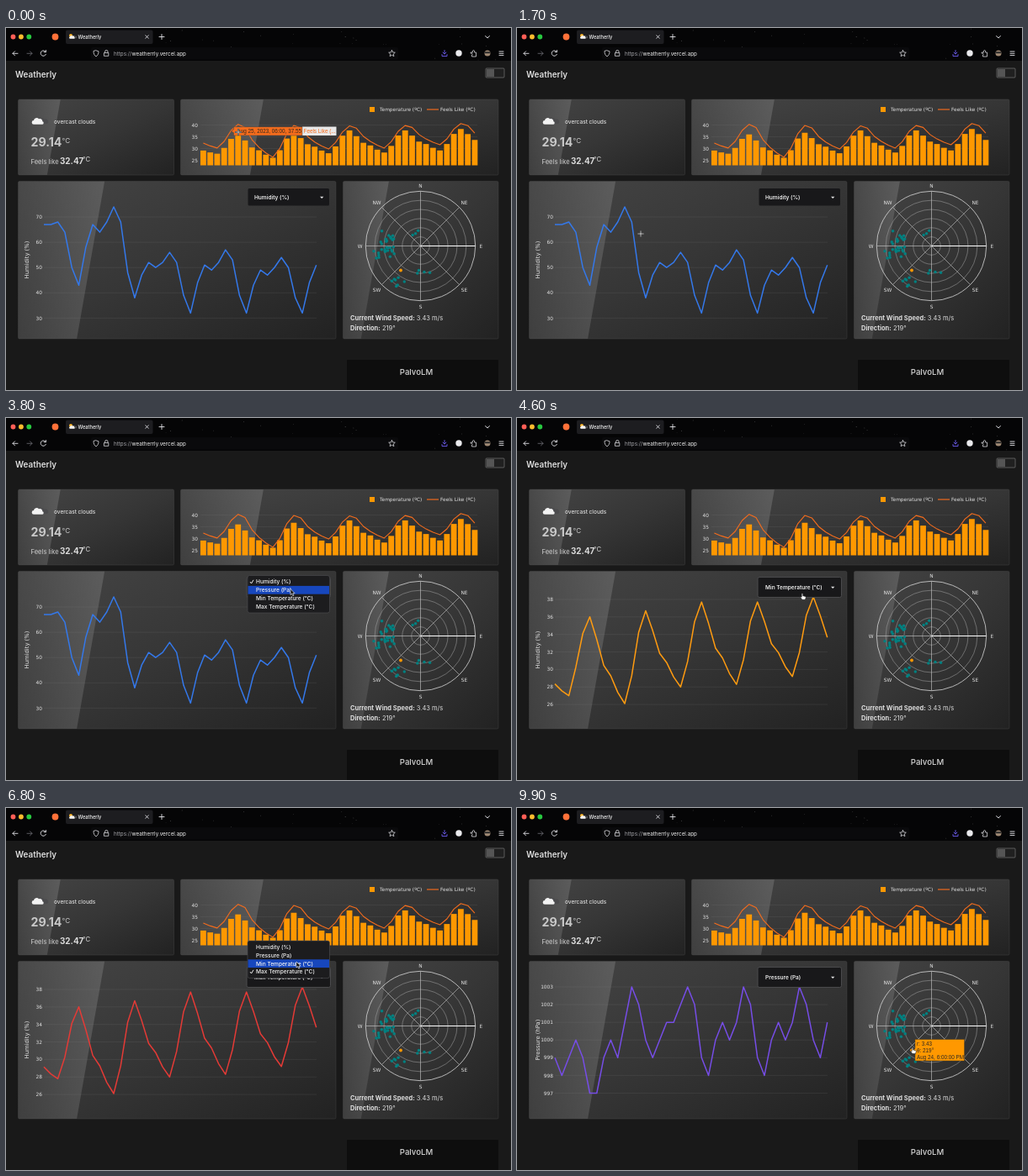
Animation, 600 px wide and 431 px high, one loop 10000 ms. Source, as an HTML page:

```html
<!DOCTYPE html>
<html lang="en">
<head>
<meta charset="utf-8">
<title>Weatherly</title>
<style>
html, body { margin: 0; width: 100%; height: 100%; overflow: hidden; background: #191919; }
svg { display: block; width: 600px; height: 431px; font-family: Inter, sans-serif; }
.plot { font-family: "DejaVu Sans", Verdana, sans-serif; font-size: 5.85px; fill: #e2e2e2; }
.tip { font-family: "Liberation Sans", Arial, sans-serif; font-size: 6.35px; }
</style>
</head>
<body>
<svg id="stage" viewBox="0 0 600 431" xmlns="http://www.w3.org/2000/svg"></svg>
<script>
const LOOP = 10000, STEP = 100;
const svg = document.getElementById('stage');

const tag = (name, attrs, body = '') =>
  `<${name} ${Object.entries(attrs).map(([k, v]) => `${k}="${v}"`).join(' ')}>${body}</${name}>`;
const rect = (x, y, width, height, fill, more = {}) => tag('rect', { x, y, width, height, fill, ...more });
const circle = (cx, cy, r, fill, more = {}) => tag('circle', { cx, cy, r, fill, ...more });
const path = (d, stroke, width = 1, more = {}) => tag('path', { d, stroke, 'stroke-width': width, fill: 'none', ...more });
const text = (x, y, body, size, fill, more = {}) => tag('text', { x, y, 'font-size': size, fill, ...more }, body);
const label = (x, y, body, anchor = 'end') => tag('text', { x, y, class: 'plot', 'text-anchor': anchor }, body);
const gradient = (id, x2, y2, stops) =>
  tag('linearGradient', { id, x1: 0, y1: 0, x2, y2 },
    stops.map(([offset, color, alpha = 1]) => tag('stop', { offset, 'stop-color': color, 'stop-opacity': alpha })).join(''));
const polyline = points => 'M' + points.map(p => p.map(v => v.toFixed(1)).join(' ')).join('L');

let seed = 11;
const random = () => (seed = seed * 16807 % 2147483647) / 2147483647;
const repeat = (n, make) => Array.from({ length: n }, (_, i) => make(i));

// Forecast: 40 three-hourly samples; each day climbs from its low to its high and falls to the next low.
const SAMPLES = 40, PER_DAY = 8, SPACING = 8.3;
function forecast({ start, rise, fall, lows, highs }) {
  const mix = (low, high, k) => low + (high - low) * k;
  return repeat(SAMPLES, i => {
    const day = Math.floor((i - start) / PER_DAY), hour = (i - start) % PER_DAY;
    return hour < rise.length ? mix(lows[day], highs[day], rise[hour])
      : mix(lows[day + 1], highs[day], fall[hour - rise.length]);
  });
}
const maxTemp = forecast({ start: -6, rise: [0, .3, .77], fall: [1, .74, .44, .32, .13],
  lows: [28, 27.8, 26.1, 28, 28.3, 29.2, 30], highs: [32, 36, 36.7, 37.7, 37.7, 38.3] });
const minTemp = maxTemp.map((v, i) => i < 3 ? v - .8 : v);
const feelsLike = forecast({ start: -6, rise: [0, .28, .74], fall: [1, .9, .53, .3, .13],
  lows: [30, 30.2, 26.3, 29.8, 30.2, 31.6, 32], highs: [37.2, 40.3, 39.8, 39.6, 39.8, 40.6] });
const humidity = forecast({ start: -3, rise: [0, .48, .76, .68, .8], fall: [1, .83, .28],
  lows: [65, 43, 38, 32, 32, 32], highs: [68, 74, 56, 57, 54, 57] }).map(Math.round);
const pressure = forecast({ start: -2, rise: [0, .33, .58, .4, .63], fall: [1, .8, .16],
  lows: [997, 997, 999, 998, 998, 999], highs: [1000, 1003, 1003, 1003, 1003, 1005] }).map(Math.round);

const tempScale = { first: 26, last: 38, gap: 2, top: 216, unit: 10.42, title: 'Humidity (%)' };
const series = [
  { name: 'Humidity (%)', title: 'Humidity (%)', data: humidity, color: '#3478ea', first: 30, last: 70, gap: 10, top: 225, unit: 3.01 },
  { name: 'Pressure (Pa)', title: 'Pressure (hPa)', data: pressure, color: '#764de6', first: 997, last: 1003, gap: 1, top: 213, unit: 21.08 },
  { name: 'Min Temperature (°C)', data: minTemp, color: '#ff9b10', ...tempScale },
  { name: 'Max Temperature (°C)', data: maxTemp, color: '#e43a36', ...tempScale }
];
const [HUM, PRES, MIN, MAX] = [0, 1, 2, 3];
const valueY = (s, v) => s.top + (s.last - v) * s.unit;
const linePoints = s => s.data.map((v, i) => [45 + i * SPACING, valueY(s, v)]);

const ROSE = { x: 492.5, y: 259.5, r: 65.2 };
const polar = (degrees, r) => {
  const a = degrees * Math.PI / 180;
  return [ROSE.x + r * Math.sin(a), ROSE.y - r * Math.cos(a)];
};
const around = (middle, spread) => middle + (random() + random() - 1) * spread;
const gusts = (count, bearing, turn, r, depth) => repeat(count, () => polar(around(bearing, turn), around(r, depth)));

// Glossy panel: a lighter wedge, cut at a quarter of a 100-degree gradient.
function card(x, y, w, h) {
  const lean = h * Math.tan(Math.PI / 18), edge = (w + lean) / 4;
  return rect(x, y, w, h, 'url(#panel)', { rx: 1.5 }) +
    tag('path', { d: `M${x} ${y}h${edge}l${-lean} ${h}H${x}z`, fill: 'url(#sheen)' }) +
    rect(x, y, w, h, 'none', { rx: 1.5, stroke: '#505050', 'stroke-width': .5, 'stroke-opacity': .7 });
}

function cloud(x, y, k) {
  return tag('g', { transform: `translate(${x} ${y}) scale(${k})` },
    tag('path', { d: 'M0 3a3 3 0 0 1 1-5a4 4 0 0 1 7-1a3 3 0 0 1 3 6z', fill: '#4b4b4d' }) +
    tag('path', { d: 'M-7 4a2.7 2.7 0 0 1 0-5.4a4 4 0 0 1 7-2.2a3.5 3.5 0 0 1 5 3.5a2.1 2.1 0 0 1 0 4.1z', fill: '#f2f2f2' }));
}

function browser() {
  const icon = (d, color = '#e4e4e8', width = .9) => path(d, color, width, { 'stroke-linecap': 'round', 'stroke-linejoin': 'round' });
  const stars = repeat(45, () => circle(190 + random() * 400, 1 + random() * 37, .15 + random() * .3, '#777')).join('');
  return rect(0, 0, 600, 39, '#050506') + stars +
    ['#ff5f57', '#febc2e', '#28c840'].map((c, i) => circle(8.5 + i * 9.4, 10.5, 2.9, c)).join('') +
    circle(58.5, 10.5, 3.9, '#ff7139') +
    rect(71, 2.5, 103.5, 16.5, '#1d1d20', { rx: 2 }) +
    circle(77, 9, 2, '#f7b52c') + cloud(79, 11, .42) +
    text(85.5, 12.8, 'Weatherly', 5.7, '#f5f5f5', { 'font-weight': 500 }) +
    icon('M165.8 8.8l3.4 3.4m0-3.4l-3.4 3.4') + icon('M182 10.5h6m-3-3v6') + icon('M569.5 9.500l2.5 2.5l2.5-2.5') +
    rect(101, 23, 365, 14.5, '#0a0a0c', { rx: 2 }) +
    icon('M14 30.3H8m2.5-2.5l-2.5 2.5l2.5 2.5') + icon('M25 30.3h6m-2.5-2.5l2.5 2.5l-2.5 2.5', '#66666b') +
    icon('M47.2 28.5a3.2 3.2 0 1 0 .2 2.8m0-4.8v2.2h-2.2') +
    icon('M107 26.8l3 1c0 3-1 5-3 6c-2-1-3-3-3-6z', '#d8d8dc', .8) +
    icon('M117.6 29.6v-1.5a1.7 1.7 0 0 1 3.4 0v1.5m-4.2 0h5v3.7h-5z', '#d8d8dc', .8) +
    text(128, 32.5, '<tspan fill="#a5a5aa">https://</tspan>weatherrly.vercel.app', 6.3, '#f2f2f2') +
    icon('M458.5 26.5l1.1 2.4l2.7.3l-2 1.8l.6 2.6l-2.4-1.3l-2.4 1.3l.6-2.6l-2-1.8l2.7-.3z', '#d8d8dc', .8) +
    icon('M521 26.5v4.5m-2-2l2 2l2-2m-5 2.5v2h6v-2', '#6d5cf0') +
    circle(538, 30, 3.7, '#e9e9ec') +
    icon('M552.5 29h2v-1.5a1 1 0 0 1 2 0v1.5h2v5h-5v-2a1 1 0 1 0-1-2z', '#d8d8dc', .8) +
    circle(572, 30, 3.5, '#a08a74') + rect(568.5, 28.3, 7, 2, '#2a2a2a', { rx: 1 }) +
    icon('M586 28h5m-5 2.3h5m-5 2.3h5');
}

function barChart() {
  const pitch = 8.27, scale = { top: 115.5, last: 40, unit: 2.8 };
  let out = rect(432, 94, 6, 6, '#ff9800') + label(444, 99.2, 'Temperature (ºC)', 'start') +
    path('M500 97h14', '#ff6d1a', 1.1) + label(516, 99.2, 'Feels Like (ºC)', 'start');
  for (let v = 40; v >= 25; v -= 5) {
    const y = valueY(scale, v);
    out += path(`M231 ${y}H560`, '#777', .4, { opacity: .4 }) + label(228, y + 2.1, v);
  }
  maxTemp.forEach((v, i) => {
    const y = valueY(scale, v);
    out += rect(231 + i * pitch, y, 6.8, 163.5 - y, '#ff9800');
  });
  return out + path(polyline(feelsLike.map((v, i) => [234.4 + i * pitch, valueY(scale, v)])), '#f56c1c', 1.1, { 'stroke-linejoin': 'round' });
}

function windRose() {
  const { x, y, r } = ROSE;
  const rings = repeat(6, i =>
    circle(x, y, r * (i + 1) / 6, 'none', { stroke: i < 5 ? '#a0a0a0' : '#d8d8d8', 'stroke-width': i < 5 ? .55 : .8 }));
  const spokes = ['N', 'NE', 'E', 'SE', 'S', 'SW', 'W', 'NW'].map((name, i) => {
    const [lx, ly] = polar(i * 45, i % 2 ? 73.5 : 71.8);
    return path(polyline([[x, y], polar(i * 45, r)]), name === 'E' ? '#fff' : '#cfcfcf', name === 'E' ? 1 : .6) +
      label(lx, ly + 2.2, name, 'middle');
  });
  const readings = [...gusts(30, 268, 30, 41, 17), ...gusts(7, 215, 14, 52, 7), ...gusts(4, 172, 24, 31, 4), ...gusts(3, 310, 70, 18, 6)];
  return rings.join('') + spokes.join('') +
    readings.map(([px, py]) => circle(px, py, 1.75, '#008080')).join('') + circle(...polar(219, 37.3), 1.9, '#ff9800');
}

function scene() {
  const bold = { 'font-weight': 700 };
  return tag('defs', {},
      gradient('panel', 1, 1, [[0, '#454545'], [.5, '#363636'], [1, '#222']]) +
      gradient('sheen', 1, .2, [[0, '#fff', .02], [1, '#fff', .15]])) +
    rect(0, 0, 600, 431, '#191919') + browser() +
    text(11, 58.7, 'Weatherly', 9.9, '#dedede', { 'font-weight': 600 }) +
    rect(570, 48, 22, 11, '#202020', { rx: 1, stroke: '#777', 'stroke-width': .7 }) + rect(571, 49, 9, 9, '#555') +
    card(14.5, 85, 185, 90) + card(207.5, 85, 377.5, 90) +
    card(14.5, 182.5, 377.5, 187.5) + card(400.5, 182.5, 184.5, 187.5) +
    cloud(39, 111.3, .86) +
    text(57, 114, 'overcast clouds', 6.5, '#dcdcdc', { 'font-weight': 500 }) +
    text(29.5, 140.5, '29.14', 14.2, '#c9c9c9', bold) + text(66.5, 137, '°C', 8.2, '#c9c9c9') +
    text(29.5, 161.5, 'Feels like', 7.6, '#d0d0d0') +
    text(64, 161.5, '32.47', 9.9, '#dcdcdc', bold) + text(91, 158.5, '°C', 7.8, '#dcdcdc') +
    barChart() + windRose() +
    text(409, 348, '<tspan font-weight="700">Current Wind Speed:</tspan> 3.43 m/s', 7.5, '#dedede') +
    text(409, 359.5, '<tspan font-weight="700">Direction:</tspan> 219°', 7.5, '#dedede') +
    rect(405, 395, 180, 40, '#0e0e0e', { rx: 1 }) +
    text(487.5, 412.8, 'PalvoLM', 9.6, '#d6d6d6', { 'text-anchor': 'middle', 'font-weight': 500 }) +
    LAYERS.map(id => tag('g', { id })).join('');
}

function lineChart(s) {
  let out = '';
  for (let v = s.first; v <= s.last; v += s.gap) {
    const y = valueY(s, v);
    out += path(`M45 ${y}H369`, '#888', .4, { opacity: .35 }) + label(43, y + 2.1, v);
  }
  return out + tag('text', { transform: 'translate(27.3 276) rotate(-90)', class: 'plot', style: 'font-size:6.8px', 'text-anchor': 'middle' }, s.title) +
    path(polyline(linePoints(s)), s.color, 1.5, { 'stroke-linejoin': 'round' });
}

function selectBox(s, focused) {
  return (focused ? rect(286, 189.5, 99.5, 24, '#1a1a1b', { rx: 2, stroke: '#4a4a4c' }) : '') +
    rect(287.5, 191, 96.5, 20.5, '#18181a', { rx: 1.5 }) +
    text(295, 204, s.name, 6.5, '#ededed', { 'font-weight': 600 }) +
    tag('path', { d: 'M373 200.8h4.4l-2.2 2.3z', fill: '#e8e8e8' });
}

function menu(checked, cursorY) {
  const row = 9.8, first = 195 - checked * row;
  const active = Math.max(0, Math.min(3, Math.round((cursorY - first) / row)));
  return rect(287, first - 7.5, 97.5, 44.5, '#1c1c1e', { rx: 2.5, stroke: '#505052', 'stroke-width': .6 }) +
    series.map((s, i) => {
      const y = first + i * row;
      return (i === active ? rect(287.5, y - row / 2, 96.5, row, '#1747bd') : '') +
        (i === checked ? path(`M290 ${y}l1.5 2l2.5-4.2`, '#fff', .9) : '') +
        text(297, y + 2.4, s.name, 6.6, '#f4f4f4', { 'font-weight': 500 });
    }).join('');
}

const tipText = (x, y, body, fill) => tag('text', { x, y, fill, class: 'tip' }, body);

function lineTip(s, i) {
  const [x, y] = linePoints(s)[i];
  const hours = 18 + i * 3, hour = hours % 24;
  const when = `Aug ${24 + Math.floor(hours / 24)}, ${hour % 12 || 12}:00:00 ${hour < 12 ? 'AM' : 'PM'}`;
  return tag('path', { d: `M${x} ${y}l3-2v-3.5h119.5v11h-119.5v-3.5z`, fill: s.color, stroke: '#fff', 'stroke-width': .6 }) +
    tipText(x + 5, y + 2.4, `Time: ${when}, Humidity: ${s.data[i]} %`, '#fff');
}

const feelsTip = () =>
  rect(352, 117.5, 40.5, 10.5, '#e8e8e8') + tipText(353.5, 125, 'Feels Like (...', '#f56c1c') +
  tag('path', { d: 'M267.5 122.7l3-2v-3h81.5v10.3h-81.5v-3.3z', fill: '#f56c1c', stroke: '#444', 'stroke-width': .5 }) +
  tipText(274.5, 125, 'Aug 25, 2023, 06:00, 37.55', '#33291f');

const windTip = () =>
  tag('path', { d: 'M470 288.5l3-2v-11h58.5v25.5h-58.5v-10.5z', fill: '#ff9800', stroke: '#55401a', 'stroke-width': .5 }) +
  ['r: 3.43', 'θ: 219°', 'Aug 24, 6:00:00 PM'].map((line, i) => tipText(475, 282.5 + i * 8, line, '#2f2a22')).join('');

// Pointer stops: time, x, y
const route = [[0, 276, 124], [600, 279, 126], [1700, 147, 245], [2700, 269, 274], [2900, 302, 269], [3600, 338, 200],
  [4100, 338, 213], [5400, 341, 206], [6400, 344, 196], [6800, 345, 184], [7200, 345, 176], [8600, 449, 245], [9700, 470, 287], [LOOP, 470, 287]];

function pointerAt(t) {
  const n = Math.max(1, route.findIndex(p => p[0] >= t));
  const [t0, x0, y0] = route[n - 1], [t1, x1, y1] = route[n];
  const u = (t - t0) / (t1 - t0), k = u * u * (3 - 2 * u);
  return [x0 + (x1 - x0) * k, y0 + (y1 - y0) * k];
}

function pointer([x, y], open, onPoint) {
  const within = (l, t, r, b) => x >= l && x <= r && y >= t && y <= b;
  const onButton = within(287, 190, 385, 214);
  const onPlot = within(231, 105, 560, 163) || within(45, 205, 369, 350) || Math.hypot(x - ROSE.x, y - ROSE.y) < ROSE.r;
  const transform = `translate(${x} ${y})`;
  if (!open && (onPoint || onButton))
    return tag('path', { transform, fill: '#fff', stroke: '#222', 'stroke-width': .6,
      d: 'M-.8-1.5q.8-1 1.5 0v2.5l3 .8q.8.5.4 1.8l-.7 2h-3.5l-2.2-2.8q.2-1 1.5-.2z' });
  if (!open && onPlot)
    return tag('g', { transform }, path('M-4 0h8M0-4v8', '#222', 1.9) + path('M-3.7 0h7.4M0-3.7v7.4', '#eee', .8));
  return tag('path', { transform, fill: '#111', stroke: '#fff', 'stroke-width': .6, d: 'M0-1v7l1.6-1.5l1.2 2.7l1.2-.6l-1.2-2.5h2.3z' });
}

// Each visit to the drop-down: opened, picked, entry checked before and after
const visits = [
  { from: 3500, to: 4200, before: HUM, after: MIN },
  { from: 4900, to: 5400, before: MIN, after: MAX },
  { from: 6300, to: 7200, before: MAX, after: PRES }
];

function tipsAt(t) {
  if (t < 600) return feelsTip();
  if (t >= 9600) return windTip();
  if (t < 1800 || t > 3200) return '';
  // The hover label trails the pointer slightly.
  const [x, y] = pointerAt(t - 200);
  const near = linePoints(series[HUM]).findIndex(p => Math.hypot(p[0] - x, p[1] - y) < 5.5);
  return near < 0 ? '' : lineTip(series[HUM], near);
}

function render(t) {
  const picked = visits.filter(v => t >= v.to).pop();
  const open = visits.find(v => t >= v.from && t < v.to);
  const current = series[picked ? picked.after : HUM];
  const position = pointerAt(t);
  layers.chart.innerHTML = lineChart(current);
  layers.select.innerHTML = selectBox(current, t >= visits[0].from) + (open ? menu(open.before, position[1]) : '');
  layers.tips.innerHTML = tipsAt(t);
  layers.pointer.innerHTML = pointer(position, open, t >= 9600);
}

const LAYERS = ['chart', 'select', 'tips', 'pointer'];
svg.innerHTML = scene();
const layers = Object.fromEntries(LAYERS.map(id => [id, document.getElementById(id)]));
const start = performance.now();
let shown = -1;
function tick() {
  const t = Math.floor(((performance.now() - start) % LOOP) / STEP) * STEP;
  if (t !== shown) render(shown = t);
  requestAnimationFrame(tick);
}
tick();
</script>
</body>
</html>
```
